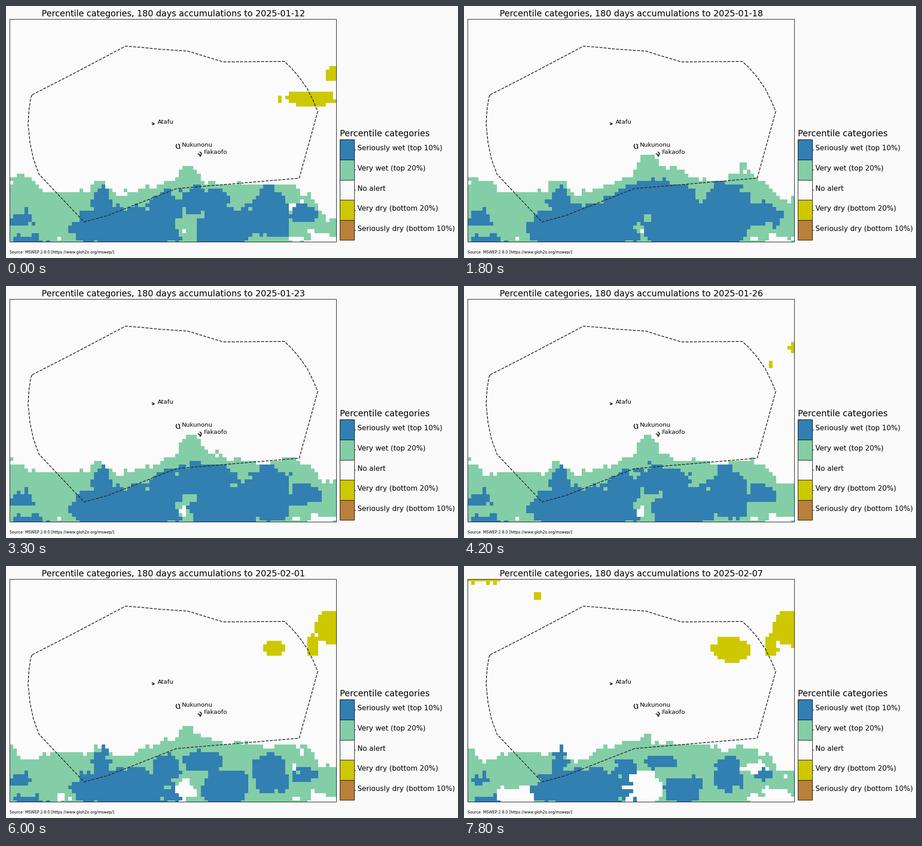
A matplotlib script for the animation above (8000 ms loop, 1002 px wide and 559 px high).

```python
import numpy as np
import matplotlib.pyplot as plt
from matplotlib.animation import FuncAnimation
from matplotlib.colors import to_rgb
from matplotlib.patches import Rectangle

W, H, DPI = 1002, 559, 100
COLS, ROWS = 89, 61
LEFT, RIGHT, TOP, BOTTOM = 8, 732, 29, 523
GRID_TOP, CELL_H = 25.4, 8.245
START = np.datetime64("2025-01-12")
PAPER, GREEN, BLUE, YELLOW, BROWN = "#fafafa", "#83cea7", "#327fb1", "#cec802", "#b8803b"

plt.rcParams["font.family"] = "DejaVu Sans"

# --- rainfall model: all lengths in grid cells ----------------------------

rng = np.random.default_rng(12)
row, col = np.mgrid[:ROWS, :COLS] + 0.5


def roughness():
    """Static clumpy noise with unit spread."""
    n = rng.normal(size=(ROWS, COLS))
    n = n + 0.5 * sum(np.roll(n, s, axis) for s in (-1, 1) for axis in (0, 1))
    return n / n.std()


wet_noise, heavy_noise, dry_noise = roughness(), roughness(), roughness()


def at(day, days, values):
    return np.interp(day, days, values)


def inside(cx, cy, rx, ry, size):
    """Positive within an ellipse, growing toward its centre."""
    return (size - np.hypot((col - cx) / rx, (row - cy) / ry)) * min(rx, ry)


# Wet belt: hills on a flat edge as (centre, width), heights on PHASES
PHASES = (0, 3, 17, 26)
FLAT = 47
HILLS = {
    (0, 2): (1, 1, 3.5, 3),
    (4, 4): (5, 5.5, -2, -2.5),
    (24, 2.5): (3, 3.5, 2.5, 0),
    (31, 4): (0, 0, 0, -2.3),
    (49, 3): (5, 5, 5, 1),
    (47, 9): (3, 5, 4, 3),
    (56, 5): (0.5, 5.5, 2, 0.5),
    (63, 5): (2, 3, 2.5, 1.5),
    (75, 6): (2, 7.5, 2.5, 1),
    (87, 5): (-7, -2, -3.5, -6),
}

# Gaps in the belt: ellipse and its size on PHASES
GAPS = {
    (47.5, 57.5, 5, 5): (0, 0, 0.35, 1.1),
    (14, 59, 7, 3.5): (0, 0, 0, 0.9),
    (84, 60, 5, 2.5): (1, 0.7, 0.8, 1.2),
    (78, 51, 3, 2): (0.8, 0, 0.3, 0.9),
}

# Heavy rain cores: ellipse and how far it swells at full intensity
CORES = {
    (31, 57, 13, 5.5): 0.15,
    (25, 50, 2, 3): 0.2,
    (43, 51, 3, 2.5): 1,
    (52, 49.5, 4, 2): 1.7,
    (59, 57, 5, 3.5): 1.2,
    (71, 53, 3.5, 4.5): 1,
    (80, 53, 1.5, 1): 2.5,
    (3, 54, 2.5, 2): 0.5,
    (4.5, 60, 3, 1.3): 0.3,
}


def wet_field(day):
    edge = FLAT - sum(at(day, PHASES, h) * np.exp(-((col - c) / w) ** 2)
                      for (c, w), h in HILLS.items())
    field = row - edge
    for gap, sizes in GAPS.items():
        field = np.minimum(field, -inside(*gap, at(day, PHASES, sizes)))
    return field + 0.6 * wet_noise


def heavy_field(day):
    level = at(day, (0, 3, 8, 17, 26), (0.6, 1, 0.95, 0.5, 0))
    cores = [inside(*core, 1 + swell * level) for core, swell in CORES.items()]
    return np.max(cores, axis=0) + 0.5 * heavy_noise


def dry_field(day):
    band = at(day, (0, 3), (1, -1))
    east = at(day, (12, 17, 26), (-0.2, 1, 1.05))
    middle = at(day, (14, 22, 26), (-0.2, 0.9, 1.15))
    corner = at(day, (22, 26), (-0.5, 1))
    spots = [inside(82, 22, 8, 2, band), inside(88, 15, 2, 2, band),
             inside(88.5, 13.5, 5, 4.8, east), inside(82.5, 18.5, 1.6, 2.5, east),
             inside(72, 19.2, 4.5, 3, middle),
             inside(3.5, 0, 5.5, 1.6, corner), inside(19, 5.5, 1.2, 0.8, corner)]
    return np.max(spots, axis=0) + 0.25 * dry_noise * (np.max(spots, axis=0) > -1)


def categories(day):
    """0 no alert, 1 very wet, 2 seriously wet, 3 very dry."""
    heavy, wet, dry = heavy_field(day) > 0, wet_field(day) > 0, dry_field(day) > 0
    return np.select([heavy, wet, dry], [2, 1, 3], 0)


# --- stage ----------------------------------------------------------------

fig = plt.figure(figsize=(W / DPI, H / DPI), dpi=DPI, facecolor=PAPER)
ax = fig.add_axes([0, 0, 1, 1])
ax.set_axis_off()


def pt(px):
    return px * 72 / DPI


def label(x, y, text, size, **kw):
    return ax.text(x, y, text, fontsize=pt(size), va="baseline", zorder=6, **kw)


def line(points, width, color="black", **kw):
    ax.plot(*zip(*points), color=color, lw=pt(width), **kw)


def box(x, y, w, h, color="none", **kw):
    return ax.add_patch(Rectangle((x, y), w, h, fc=color, ec="black", lw=pt(1), **kw))


palette = np.array([to_rgb(c) for c in ("#fbfbfb", GREEN, BLUE, YELLOW)])
grid = ax.imshow(palette[categories(0)], aspect="auto", interpolation="nearest", zorder=1,
                 extent=(LEFT, RIGHT + 1, GRID_TOP + ROWS * CELL_H, GRID_TOP))
grid.set_clip_path(box(LEFT, TOP, RIGHT - LEFT, BOTTOM - TOP, zorder=5))
ax.set_xlim(0, W)
ax.set_ylim(H, 0)

# maritime boundary
zone = [(58, 197), (140, 155), (265, 89), (303, 92), (335, 95.5), (403, 100),
        (440, 111.5), (482, 124), (617, 123), (632, 137), (650, 158), (668, 184),
        (681, 210), (691, 234), (675, 292), (650, 382), (378, 405), (225, 465),
        (173, 479), (73, 373), (61, 340), (53, 302), (49, 262), (51, 230),
        (55, 203), (58, 197)]
line(zone, 1.75, "#2a2a2a", ls="--", zorder=3)

# atolls
for shore in ([(324, 259.5), (327, 260), (328.5, 261.5), (326, 263), (324.5, 263)],
              [(378, 307), (377, 311), (378, 314), (380, 316)],
              [(382.5, 306.5), (384.5, 308), (384.5, 312), (385.5, 315), (383, 316)],
              [(430, 324), (433, 326.5), (432.5, 330), (430.5, 333.5)],
              [(426, 328), (429, 329), (430, 332)]):
    line(shore, 1.8, zorder=4)
for x, y, name in ((336, 261, "Atafu"), (390, 312, "Nukunonu"), (438.5, 328, "Fakaofo")):
    label(x, y, name, 13.45)

# legend
label(740, 289, "Percentile categories", 19.05)
STEP = 44.6
LEGEND = (("Seriously wet (top 10%)", BLUE), ("Very wet (top 20%)", GREEN),
          ("No alert", PAPER), ("Very dry (bottom 20%)", YELLOW),
          ("Seriously dry (bottom 10%)", BROWN))
for n, (name, color) in enumerate(LEGEND):
    y = 296.4 + n * STEP
    box(740, y, 32, STEP, color, zorder=3)
    line([(773, y + STEP / 2), (775.5, y + STEP / 2)], 1, zorder=3)
    label(779.5, y + 24, name, 15.65)

label(8, 549, "Source: MSWEP 2.8.0 [https://www.gloh2o.org/mswep/]", 8.35)
title = label(370.5, 23, "", 19.02, ha="center")


def draw(i):
    day = i // 3
    grid.set_data(palette[categories(day)])
    title.set_text(f"Percentile categories, 180 days accumulations to {START + day}")
    return grid, title


anim = FuncAnimation(fig, draw, frames=80, interval=100, repeat=True)
plt.show()
```
